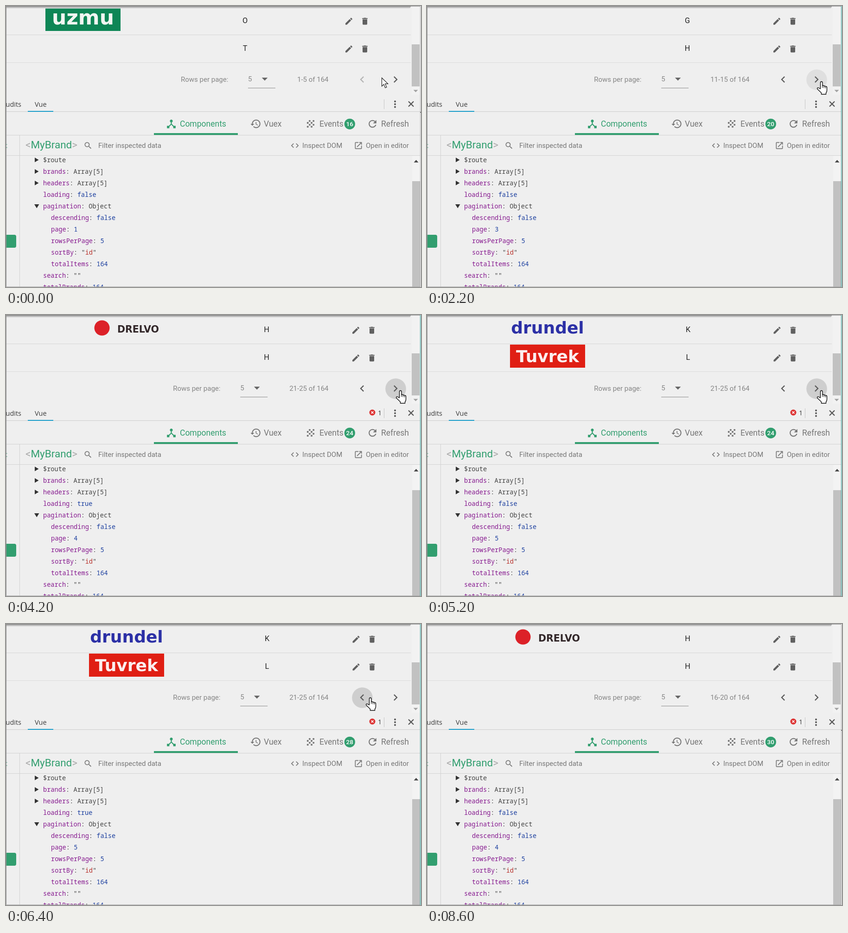
Write an HTML page that moves like this. It is 895 by 608 pixels and loops after 8.8 s.

```html
<!DOCTYPE html>
<html lang="en">
<head>
<meta charset="utf-8">
<title>Pagination state</title>
<style>
html, body { margin: 0; width: 100%; height: 100%; overflow: hidden; background: #efefef; }
svg { display: block; width: 895px; height: 608px; }
text { font-family: Roboto, sans-serif; white-space: pre; }
.ui { font-family: "Open Sans", sans-serif; font-size: 14.5px; fill: #3a3a3a; }
.foot { font-size: 15px; fill: #858585; }
.cell { font-size: 16.25px; fill: #222; text-anchor: middle; }
.tab { font-size: 17.5px; fill: #777; }
.tool { font-size: 15px; fill: #777; }
.tree text { font-family: "Noto Sans Mono", monospace; font-size: 13.65px; fill: #444; }
.tree .key { fill: #86198f; }
.tree .val { fill: #1c3f9f; }
.tree .str { fill: #b8322c; }
.brand { font-family: "DejaVu Sans", sans-serif; font-weight: bold; text-anchor: middle; }
</style>
</head>
<body>
<svg id="stage" viewBox="0 0 895 608"></svg>
<script>
const LOOP = 8800, STEP = 200, GREEN = '#329e6f';
const stage = document.getElementById('stage');
const $ = id => document.getElementById(id);

const ICONS = {
  edit: 'M3 17.25V21h3.75L17.81 9.94l-3.75-3.75L3 17.25zM20.71 7.04c.39-.39.39-1.02 0-1.41l-2.34-2.34c-.39-.39-1.02-.39-1.41 0l-1.83 1.83 3.75 3.75 1.83-1.83z',
  bin: 'M6 19c0 1.1.9 2 2 2h8c1.1 0 2-.9 2-2V7H6v12zM19 4h-3.5l-1-1h-5l-1 1H5v2h14V4z',
  next: 'M10 6L8.59 7.41 13.17 12l-4.58 4.59L10 18l6-6z',
  prev: 'M15.41 7.41L14 6l-6 6 6 6 1.41-1.41L10.83 12z',
  hub: 'M17 16l-4-4V8.82C14.16 8.4 15 7.3 15 6c0-1.66-1.34-3-3-3S9 4.34 9 6c0 1.3.84 2.4 2 2.82V12l-4 4H3v5h5v-3.05l4-4.2 4 4.2V21h5v-5h-4z',
  history: 'M13 3c-4.97 0-9 4.03-9 9H1l3.89 3.89.07.14L9 12H6c0-3.87 3.13-7 7-7s7 3.13 7 7-3.13 7-7 7c-1.93 0-3.68-.79-4.94-2.06l-1.42 1.42C8.27 19.99 10.51 21 13 21c4.97 0 9-4.03 9-9s-4.03-9-9-9zm-1 5v5l4.28 2.54.72-1.21-3.5-2.08V8H12z',
  refresh: 'M17.65 6.35C16.2 4.9 14.21 4 12 4c-4.42 0-7.99 3.58-7.99 8s3.57 8 7.99 8c3.73 0 6.84-2.55 7.73-6h-2.08c-.82 2.33-3.04 4-5.65 4-3.31 0-6-2.69-6-6s2.69-6 6-6c1.66 0 3.14.69 4.22 1.78L13 11h7V4l-2.35 2.35z',
  search: 'M15.5 14h-.79l-.28-.27A6.471 6.471 0 0 0 16 9.5 6.5 6.5 0 1 0 9.5 16c1.61 0 3.09-.59 4.23-1.57l.27.28v.79l5 4.99L20.49 19l-4.99-5zm-6 0C7.01 14 5 11.99 5 9.5S7.01 5 9.5 5 14 7.01 14 9.5 11.99 14 9.5 14z',
  code: 'M9.4 16.6L4.8 12l4.6-4.6L8 6l-6 6 6 6 1.4-1.4zm5.2 0l4.6-4.6-4.6-4.6L16 6l6 6-6 6-1.4-1.4z',
  open: 'M19 19H5V5h7V3H5c-1.11 0-2 .9-2 2v14c0 1.1.89 2 2 2h14c1.1 0 2-.9 2-2v-7h-2v7zM14 3v2h3.59l-9.83 9.83 1.41 1.41L19 6.41V10h2V3h-7z'
};

// Markup helpers
const rect = (x, y, w, h, fill, more = '') =>
  `<rect x="${x}" y="${y}" width="${w}" height="${h}" fill="${fill}" ${more}/>`;
const dot = (x, y, r, fill, more = '') =>
  `<circle cx="${x}" cy="${y}" r="${r}" fill="${fill}" ${more}/>`;
const path = (d, fill, more = '') => `<path d="${d}" fill="${fill}" ${more}/>`;
const text = (x, y, s, cls, more = '') => `<text x="${x}" y="${y}" class="${cls}" ${more}>${s}</text>`;
const group = (id, body, more = '') => `<g id="${id}" ${more}>${body}</g>`;
// An icon of the given size, centred on x, y
const icon = (name, x, y, size, fill, more = '') =>
  path(ICONS[name], fill, `transform="translate(${x - size / 2} ${y - size / 2}) scale(${size / 24})" ${more}`);

const grain = [[10, 6], [18, 6], [6, 10], [14, 10], [10, 14], [18, 14], [6, 18], [14, 18]]
  .map(([x, y]) => dot(644.5 + x * 1.04, 242.5 + y * 1.04, 2.05, '#777')).join('');

function treeLine(i, indent, key, value, cls = '', id = '') {
  const name = key[0] === '$' ? key : `<tspan class="key">${key}</tspan>: `;
  return text(indent, 338 + i * 25, `${name}<tspan class="${cls}" ${id && `id="${id}"`}>${value}</tspan>`, '');
}

const table =
  rect(1, 62, 872, 1, '#d6d6d6') + rect(1, 122, 872, 1, '#dcdcdc') +
  group('logo1', rect(85, 4, 162, 50, '#0e8656') +
    text(166, 40, 'uzmu', 'brand', 'font-size="44" fill="#f2f6f2"')) +
  group('logo4', dot(207, 28, 16.5, '#dc2128') +
    text(285, 38, 'DRELVO', 'brand', 'font-size="20.5" fill="#33282a"')) +
  group('logo5', text(260, 40, 'drundel', 'brand', 'font-size="36" fill="#2c30a6"') +
    rect(179, 64, 162, 50, '#e01f14') +
    text(260, 102, 'Tuvrek', 'brand', 'font-size="36" fill="#fbeeee"')) +
  text(515, 37, '', 'cell', 'id="cellA"') + text(515, 97, '', 'cell', 'id="cellB"') +
  group('actions', [33, 93].map(y =>
    icon('edit', 739.5, y, 20, '#606060') + icon('bin', 774, y, 20, '#606060')).join(''));

const footer =
  group('pager', text(377, 164, 'Rows per page:', 'foot') + text(522, 163, '5', 'foot') +
    path('M551.7 155h12.6l-6.3 6.4z', '#666') + rect(522, 177, 59, 1, '#8c8c8c')) +
  text(695.5, 164, '', 'foot', 'id="range" text-anchor="end"') +
  dot(840.5, 159.5, 22.3, '#cecece', 'id="ripple"') +
  icon('prev', 768, 159, 28, '#666', 'id="prev"') + icon('next', 840, 159, 28, '#5c5c5c');

const chrome =
  rect(1, 0, 872, 2, '#9b9b9b') + rect(1, 2, 871, 2, '#bdbdbd') + rect(1, 4, 870, 1.5, '#dddddd') +
  rect(875, 2, 18, 190, '#f2f2f2') + rect(875, 83, 17, 91, '#c1c1c1') +
  path('M878.5 181.5h10l-5 5z', '#a0a0a0');

const bar =
  text(33, 218, 'udits', 'ui', 'text-anchor="end"') + text(62, 218, 'Vue', 'ui') +
  rect(0, 228, 893, 1, '#cbcbcb') + rect(47, 227, 55, 2, '#189cc9') +
  rect(815, 202, 1, 21, '#c6c6c6') +
  [206.5, 212.5, 218.5].map(y => dot(839, y, 2, '#555')).join('') +
  path('M868 206.5l11 11m0-11l-11 11', 'none', 'stroke="#555" stroke-width="2.2"') +
  group('error', dot(790, 211, 6.5, '#dd3434') +
    path('M787.5 208.5l5 5m0-5l-5 5', 'none', 'stroke="#fff" stroke-width="1.5"') +
    text(802, 217, '1', 'ui'));

const tabs =
  rect(0, 279, 893, 1, '#d2d2d2') + rect(319, 275, 181, 4, GREEN) +
  icon('hub', 356.5, 255, 25, GREEN) + text(375, 261, 'Components', 'tab', `style="fill:${GREEN}"`) +
  icon('history', 538.5, 255, 24.5, '#777') + text(556, 261, 'Vuex', 'tab') +
  grain + text(676, 261, 'Events', 'tab') + dot(741.3, 255.3, 11.6, GREEN) +
  text(741.3, 260, '', '', 'id="events" font-size="13.5" font-weight="500" fill="#fff" text-anchor="middle"') +
  icon('refresh', 790.5, 255, 25, '#777') + text(809, 261, 'Refresh', 'tab');

const tools =
  rect(0, 323, 893, 1, '#d2d2d2') + rect(29, 280, 1, 328, '#d2d2d2') +
  text(3, 307, 't', 'tool', `style="fill:${GREEN}" text-anchor="end"`) +
  path('M0 495h18a4 4 0 0 1 4 4v20a4 4 0 0 1-4 4H0z', GREEN) +
  text(42, 308, `<tspan fill="#aaa">&lt;</tspan>MyBrand<tspan fill="#aaa">&gt;</tspan>`, '', `font-size="22.5" fill="${GREEN}"`) +
  icon('search', 177, 302, 20, '#777') + text(199, 307, 'Filter inspected data', 'tool') +
  icon('code', 623, 302, 20, '#777') + text(639, 307, 'Inspect DOM', 'tool') +
  icon('open', 760, 302, 20, '#777') + text(776, 307, 'Open in editor', 'tool');

const tree = group('tree',
  [0, 1, 2].map(i => path(`M62 ${328 + i * 25}l8.5 5-8.5 5z`, '#333')).join('') +
  path('M61 429h10.500l-5.250 8.500z', '#333') +
  treeLine(0, 80, '$route', '') +
  treeLine(1, 80, 'brands', 'Array[5]') +
  treeLine(2, 80, 'headers', 'Array[5]') +
  treeLine(3, 80, 'loading', 'false', 'val', 'loading') +
  treeLine(4, 80, 'pagination', 'Object') +
  treeLine(5, 97, 'descending', 'false', 'val') +
  treeLine(6, 97, 'page', '1', 'val', 'page') +
  treeLine(7, 97, 'rowsPerPage', '5', 'val') +
  treeLine(8, 97, 'sortBy', '"<tspan class="str">id</tspan>"') +
  treeLine(9, 97, 'totalItems', '164', 'val') +
  treeLine(10, 80, 'search', '""') +
  treeLine(11, 80, 'totalBrands', '164', 'val'), 'class="tree"') +
  rect(876, 324, 17, 284, '#f3f3f3') + rect(876, 379, 17, 229, '#c1c1c1') +
  path('M879.500 338.500h10l-5-5.500z', '#444');

const frame =
  rect(0, 0, 1, 608, '#8c8c8c') + rect(0, 0, 895, 1, '#8c8c8c') + rect(0, 607, 895, 1, '#a8a8a8') +
  rect(893, 0, 1, 608, '#b4b4b4', 'id="edge"') + rect(894, 0, 1, 608, '#e8e8e8') +
  rect(893, 229, 2, 2, '#666', 'id="notch"');

const cursors =
  path('M.5.5V18.500l4.200-4 3.200 7.500 3-1.300-3.200-7.300h6z', '#fff', 'id="arrow" stroke="#222" stroke-width="1.200"') +
  group('hand',
    path('M7.500 16V2.700a2.200 2.200 0 0 1 4.400 0V9.500q2-1.400 3.400.8 2-1 3.200.9 3-.7 3 2.300v6q0 3-2 5.500v3H9.500v-3L1.200 17q-1.400-2 .4-3.200 2-.6 3.600 1.400z',
      '#fff', 'stroke="#111" stroke-width="1.400" stroke-linejoin="round"') +
    path('M11.900 9.500v4.500m3.400-3.500v4m3.300-3v3.500', 'none', 'stroke="#111" stroke-width="1.100"'));

stage.innerHTML = rect(0, 0, 895, 608, '#efefef') + table + footer + chrome + bar + tabs + tools + tree + frame + cursors;

// Last two table rows per page: letters, letter x, shift of the action icons
const ROWS = {
  1: ['O', 'T', 515.5, 0], 2: ['D', 'E', 561, 15], 3: ['G', 'H', 561.5, 15],
  4: ['H', 'H', 562, 15], 5: ['K', 'L', 563, 15.5], 6: ['L', 'M', 515.5, 0]
};
const PREV = 768.5, NEXT = 840.5, DARK = '#cecece', LIGHT = '#dfdfdf';

// State changes: [time, patch]
const CUES = [
  [0, { foot: 1, rows: 1, page: 1, events: 16, loading: false, at: 0, tone: LIGHT, focus: false, error: false }],
  [400, { at: NEXT }],
  [800, { foot: 2, events: 18, tone: DARK, focus: true }],
  [1200, { rows: 2, page: 2 }],
  [1400, { tone: LIGHT }],
  [1800, { foot: 3, events: 20, tone: DARK }],
  [2000, { rows: 3 }],
  [2200, { page: 3, tone: LIGHT }],
  [2800, { foot: 4, events: 22, tone: DARK }],
  [3000, { loading: true }],
  [3200, { rows: 4, page: 4, loading: false, error: true }],
  [3600, { tone: LIGHT }],
  [4000, { foot: 5, events: 24, tone: DARK }],
  [4200, { loading: true }],
  [4400, { rows: 5, page: 5, loading: false, tone: LIGHT }],
  [5000, { tone: DARK }],
  [5400, { foot: 6, events: 26, loading: true }],
  [5600, { rows: 6, page: 6, loading: false }],
  [5800, { tone: LIGHT }],
  [6000, { at: 0 }],
  [6200, { at: PREV, tone: DARK, foot: 5, events: 28 }],
  [6400, { rows: 5, page: 5, loading: true }],
  [6600, { loading: false }],
  [6800, { tone: LIGHT }],
  [7200, { foot: 4, events: 30, tone: DARK }],
  [7400, { loading: true }],
  [7600, { rows: 4, page: 4, loading: false }],
  [7800, { tone: LIGHT }],
  [8000, { at: 0 }],
  [8600, { focus: false }]
];

// Pointer path: [time, x, y]
const MOVES = [[0, 810, 155], [400, 841, 163], [5800, 841, 163], [6200, 776, 159], [7800, 776, 159], [8200, 73, 480]];

function pointer(t) {
  let i = MOVES.length - 1;
  while (i && MOVES[i][0] > t) i--;
  const a = MOVES[i], b = MOVES[i + 1] || a;
  const k = a === b ? 0 : (t - a[0]) / (b[0] - a[0]);
  return [a[1] + (b[1] - a[1]) * k, a[2] + (b[2] - a[2]) * k];
}

const show = (id, on) => $(id).setAttribute('visibility', on ? 'visible' : 'hidden');
const move = (id, x, y = 0) => $(id).setAttribute('transform', `translate(${x} ${y})`);
const put = (id, s) => { $(id).textContent = s; };

function draw(t) {
  const s = Object.assign({}, ...CUES.filter(c => c[0] <= t).map(c => c[1]));
  const [a, b, x, shift] = ROWS[s.rows];
  put('cellA', a);
  put('cellB', b);
  for (const id of ['cellA', 'cellB']) $(id).setAttribute('x', x);
  move('actions', shift);
  for (const n of [1, 4, 5]) show('logo' + n, s.rows === n);

  const range = `${s.foot * 5 - 4}-${s.foot * 5} of 164`;
  put('range', range);
  move('pager', (10 - range.length) * 8.43);
  $('prev').setAttribute('fill', s.rows > 1 ? '#5c5c5c' : '#b4b4b4');
  show('ripple', s.at);
  $('ripple').setAttribute('cx', s.at);
  $('ripple').setAttribute('fill', s.tone);

  put('events', s.events);
  put('loading', s.loading);
  put('page', s.page);
  show('error', s.error);
  $('edge').setAttribute('fill', s.focus ? '#2a9b94' : '#b4b4b4');
  show('notch', !s.focus);

  const [px, py] = pointer(t);
  show('arrow', !s.at && t < 8400);
  show('hand', s.at);
  move('arrow', px, py);
  move('hand', px, py);
}

function tick(now) {
  draw(Math.floor(now % LOOP / STEP) * STEP);
  requestAnimationFrame(tick);
}
draw(0);
requestAnimationFrame(tick);
</script>
</body>
</html>
```
